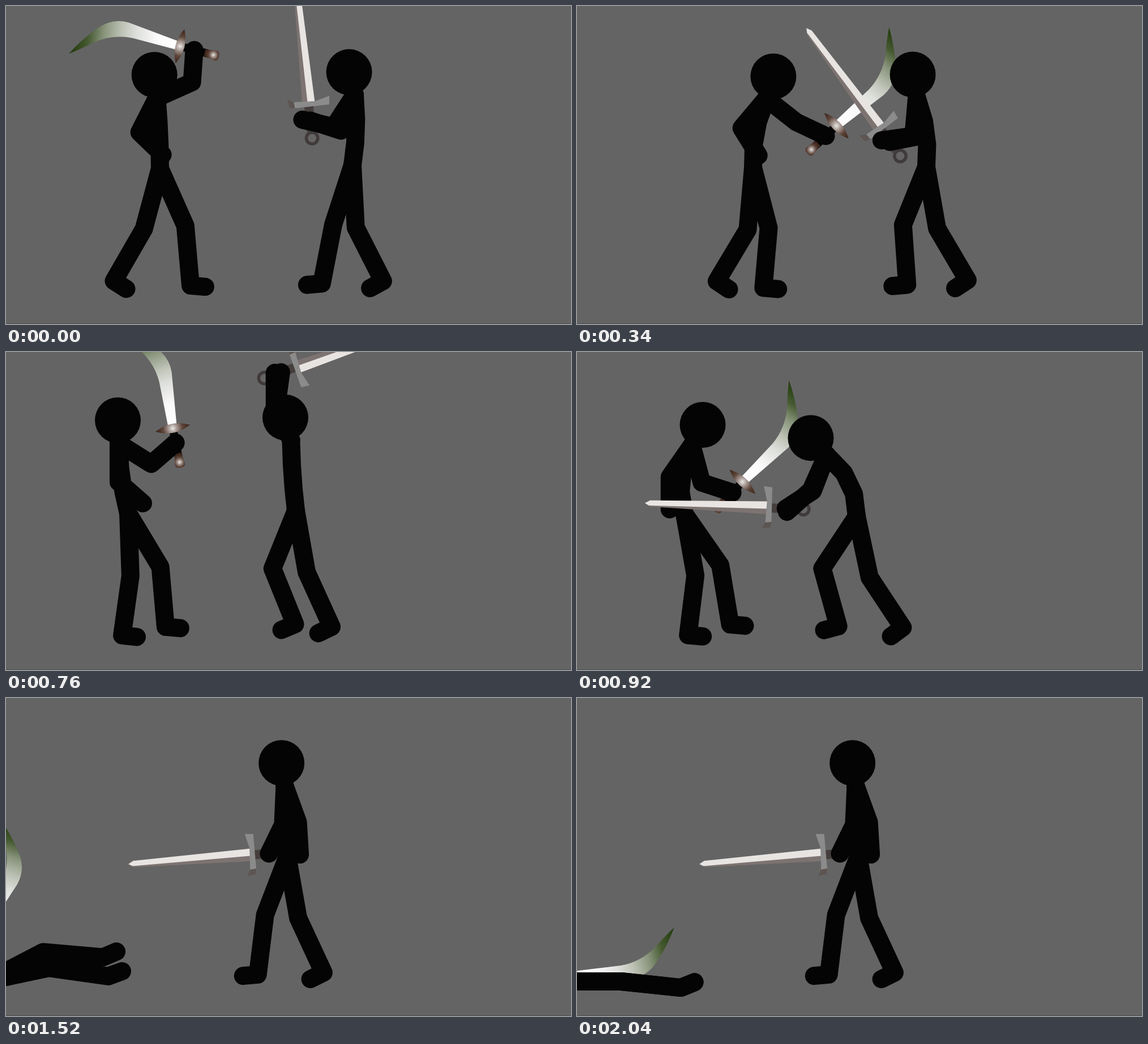
Animation, 998 px wide and 561 px high, one loop 2.18 s. Source, as an HTML page with a canvas:

```html
<!DOCTYPE html>
<html lang="en">
<head>
<meta charset="utf-8">
<title>Sword duel</title>
<style>
  html, body { margin: 0; width: 100%; height: 100%; overflow: hidden; background: #646464; }
  canvas { display: block; }
</style>
</head>
<body>
<canvas id="stage" width="998" height="561"></canvas>
<script>
const ctx = document.getElementById('stage').getContext('2d');
const LOOP = 2180, LAST = 2040, STEP = 20;
const INK = '#040404', LIMB = 32, HEAD = 40.5;
const SPINE = [40, 41, 44], NECK = 41, ARM = [68, 57], LEG = [110, 106, 26];

// Key poses, all angles in degrees.
// spine: lean from upright, extra bend per segment, head tilt.
// arms and legs: upper and lower angle of each limb, 0 pointing right, 90 down.
const left = [
  { t: 0, hip: [272, 287], spine: [-1, -1.5, -6], arms: [-24, -86, 117, 44], legs: [105, 120, 66, 85], sword: [-165.5] },
  { t: 340, hip: [311, 285], spine: [1.5, 9, 18], arms: [38, 25, 130, 58], legs: [95, 121, 75.5, 95], sword: [-43.5] },
  { t: 760, hip: [216, 285], spine: [-12.5, 4.5, -2], arms: [32, -41, 90, 41], legs: [88, 98, 59, 85], sword: [-101.5] },
  { t: 920, hip: [190, 286], spine: [-10, 15.5, 28], arms: [75, 18, 125, 90], legs: [80, 97, 55, 80.5], sword: [-47] },
  { t: 1200, hip: [121, 327], spine: [-30, 4, 8], arms: [47, 31, 43, 27], legs: [43.5, 88, 43, 62], sword: [5] },
  { t: 1520, hip: [-32, 499], spine: [-90, 0, -88], arms: [-34, -32, -25, 0], legs: [-12, 8, -27.5, 5], sword: [-63] },
  { t: 2040, hip: [-32, 500], spine: [-90, 0, -88], arms: [-3, -4, 2, 2], legs: [0, 6, 0, 6], sword: [-7] },
];
const clash = { t: 340, hip: [617, 284], spine: [2, -9.5, -10], arms: [95, 172, 83, 169], legs: [112, 86, 80, 59.5], sword: [-126.5] };
const right = [
  { t: 0, hip: [612, 281], spine: [7, -5, -14], arms: [123, 193, 111, 198], legs: [108, 101, 87, 63], sword: [-96] },
  clash,
  { ...clash, t: 440, hip: [628, 284] },
  { t: 600, hip: [588, 284], spine: [-3, 3, -14], arms: [222, 285, 226, 289], legs: [112, 76, 80, 62], sword: [9] },
  { t: 760, hip: [512, 280], spine: [-6, 2, -14], arms: [245, 270, 248, 278], legs: [112, 68, 80, 65.5], sword: [-19] },
  { t: 920, hip: [494, 290], spine: [-7, -18.5, -43], arms: [114, 138, 111, 147], legs: [123.5, 74.5, 78, 56.5], sword: [-178] },
  { t: 1200, hip: [497, 283], spine: [-2, -14, -34], arms: [69.5, 109, 69.5, 105], legs: [115, 92.5, 74, 65], sword: [-204] },
  { t: 1520, hip: [497, 280], spine: [2, -4, -8], arms: [70, 86.5, 92.5, 116], legs: [111, 97, 80, 65], sword: [-184.5] },
];

function poseAt(keys, time) {
  const next = keys.findIndex(k => k.t > time);
  if (next < 0) return keys[keys.length - 1];
  const a = keys[next - 1], b = keys[next];
  const k = (time - a.t) / (b.t - a.t), pose = {};
  for (const part of ['hip', 'spine', 'arms', 'legs', 'sword'])
    pose[part] = a[part].map((v, i) => v + (b[part][i] - v) * k);
  return pose;
}

const rad = deg => deg * Math.PI / 180;
const reach = ([x, y], len, deg) => [x + len * Math.cos(rad(deg)), y + len * Math.sin(rad(deg))];

// Joints of a chain of bones, starting at a point.
function chain(from, lengths, angles) {
  const points = [from];
  angles.forEach((a, i) => points.push(reach(points[i], lengths[i], a)));
  return points;
}

// Feet stay flat until the shin trails behind; the ankle limits the bend.
function footAngle(shin, facing) {
  const s = facing > 0 ? shin : 180 - shin;
  const foot = Math.min(Math.max(5, 1.2 * (s - 93)), s - 28);
  return facing > 0 ? foot : 180 - foot;
}

function build(pose, facing) {
  const { hip, spine: [lean, bend, tilt], arms, legs, sword } = pose;
  const spine = chain(hip, SPINE, SPINE.map((_, i) => lean + bend * i - 90));
  const limbs = [0, 2].flatMap(i => [
    chain(spine[3], ARM, arms.slice(i, i + 2)),
    chain(hip, LEG, [legs[i], legs[i + 1], footAngle(legs[i + 1], facing)]),
  ]);
  return {
    lines: [spine, ...limbs],
    head: reach(spine[3], NECK, tilt - 90),
    hands: [limbs[0][2], limbs[2][2]],
    sword: rad(sword[0]),
  };
}

function drawBody({ lines, head }) {
  ctx.strokeStyle = ctx.fillStyle = INK;
  ctx.lineWidth = LIMB;
  ctx.lineCap = ctx.lineJoin = 'round';
  for (const line of lines) {
    ctx.beginPath();
    line.forEach(p => ctx.lineTo(...p));
    ctx.stroke();
  }
  ctx.beginPath();
  ctx.arc(...head, HEAD, 0, 7);
  ctx.fill();
}

function shape(fill, d) {
  ctx.fillStyle = fill;
  ctx.fill(new Path2D(d));
}

function shaded(gradient, stops) {
  stops.forEach(([at, color]) => gradient.addColorStop(at, color));
  return gradient;
}

const steel = shaded(ctx.createLinearGradient(0, 0, 187, -30), [
  [0, '#fff'], [.22, '#fafafa'], [.42, '#dddfdb'], [.56, '#bcc1b4'], [.72, '#87937a'], [.86, '#465a31'], [1, '#263d10']]);
const glow = (x, r) => shaded(ctx.createRadialGradient(x, 0, 0, x, 0, r), [
  [0, '#ece8e6'], [.25, '#a89b95'], [.6, '#5c4439'], [1, '#3f261b']]);
const guardGlow = glow(0, 29), pommelGlow = glow(-61, 14);

// Origin at the guard, blade along +x.
function cutlass() {
  shape(INK, 'M0-7H-52V7H0Z');
  shape(pommelGlow, 'M-45-6L-66-9Q-71-8-71 0Q-71 8-66 9L-45 6Z');
  shape(steel, 'M4-7.3L85-7Q122-9 151-33Q170-50 187-62Q172-33 151-8Q130 19 98 18L4 8Z');
  shape(guardGlow, 'M0-31Q16 0 0 31Q-16 0 0-31Z');
}

// Origin at the pommel ring, blade along +x.
function longsword() {
  ctx.strokeStyle = '#413a3b';
  ctx.lineWidth = 5.5;
  ctx.beginPath();
  ctx.arc(0, 0, 10.2, 0, 7);
  ctx.stroke();
  shape('#453e3d', 'M12-8H57V8H12Z');
  shape('#7d7371', 'M64-11L270-5L280 1L64 0Z');
  shape('#e8e4e2', 'M64-1.5L273-3L280 1L271 6L64 11.4Z');
  shape('#5d5551', 'M66-25L72-36.5L57-34L55.5-24Z');
  shape('#8b8b8b', 'M71 38L56 36.5L55.4-24.5L66.3-25.5L64.4 12.2Z');
}

function drawHeld(weapon, hand, angle, offset) {
  ctx.save();
  ctx.translate(...hand);
  ctx.rotate(angle);
  ctx.translate(offset, 0);
  weapon();
  ctx.restore();
}

function draw(time) {
  ctx.fillStyle = '#646464';
  ctx.fillRect(0, 0, 998, 561);
  ctx.fillStyle = '#4c4c4c';
  ctx.fillRect(0, 560, 998, 1);
  const a = build(poseAt(left, time), 1);
  const b = build(poseAt(right, time), -1);
  drawHeld(cutlass, a.hands[0], a.sword, 26);
  drawBody(a);
  drawHeld(longsword, b.hands[1], b.sword, -31);
  drawBody(b);
}

const start = performance.now();
function tick() {
  const time = (performance.now() - start) % LOOP;
  draw(Math.min(LAST, Math.floor(time / STEP) * STEP));
  requestAnimationFrame(tick);
}
tick();
</script>
</body>
</html>
```
